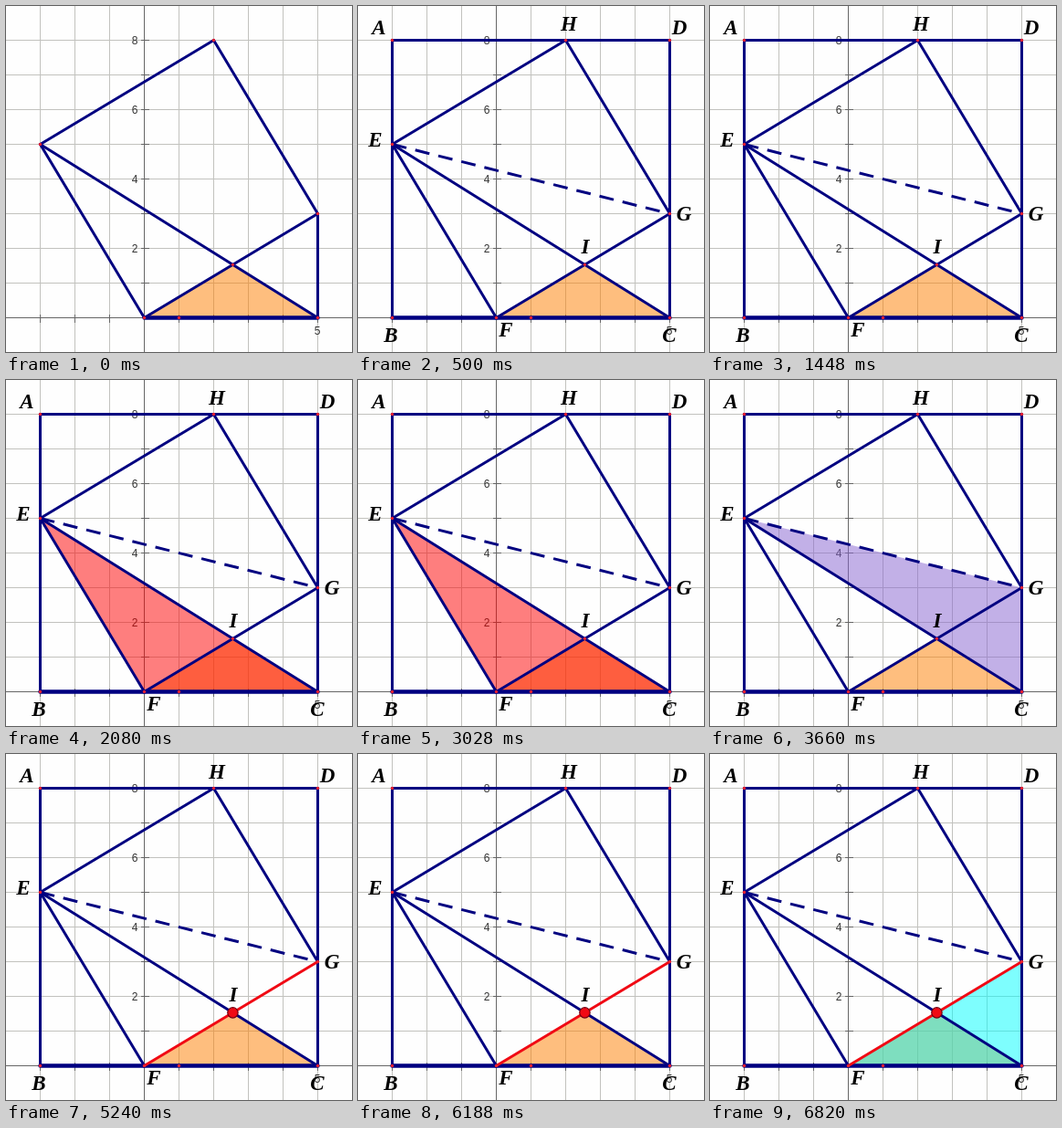
An HTML page that plays this animation: 379 px wide and 379 px high, repeating every 8000 ms.

```html
<!DOCTYPE html>
<html lang="en">
<head>
<meta charset="utf-8">
<title>Triangle areas in a square</title>
<style>
  html, body { margin: 0; width: 100%; height: 100%; overflow: hidden; background: #fefefe; }
  svg { display: block; width: 379px; height: 379px; }
  .number { font: 12px "Liberation Sans", Arial, sans-serif; fill: #333; }
  .label { font: italic bold 23px "Liberation Serif", "Times New Roman", serif; fill: #000; text-anchor: middle; }
</style>
</head>
<body>
<svg id="stage" viewBox="0 0 379 379"></svg>
<script>
const LOOP = 8000;
const STARTS = [0, 500, 2080, 3660, 5240, 6820];
const NAVY = '#000080';
const RED = '#f00a14';
const UNIT = 38;
const px = x => 151.5 + x * UNIT;
const py = y => 341.5 - y * UNIT;

// Vertices in graph units
const P = {
  A: [-3, 8], B: [-3, 0], C: [5, 0], D: [5, 8], E: [-3, 5],
  F: [0, 0], G: [5, 3], H: [2, 8], I: [125 / 49, 75 / 49], U: [1, 0]
};
const at = name => [px(P[name][0]), py(P[name][1])];

const stage = document.getElementById('stage');
const staged = [];

// Adds a shape that is visible in the given steps, or always
function add(tag, attrs, steps) {
  const el = document.createElementNS('http://www.w3.org/2000/svg', tag);
  for (const key in attrs) el.setAttribute(key, attrs[key]);
  stage.appendChild(el);
  if (steps) staged.push({ el, steps });
  return el;
}

function rule(x1, y1, x2, y2, stroke) {
  add('line', { x1, y1, x2, y2, stroke, 'shape-rendering': 'crispEdges' });
}

function fill(names, color, steps) {
  const points = [...names].map(n => at(n).join()).join(' ');
  add('polygon', { points, fill: color, 'fill-opacity': 0.5 }, steps);
}

function segment(names, steps, width = 3, stroke = NAVY, dash = 'none') {
  const [[x1, y1], [x2, y2]] = [...names].map(at);
  add('line', {
    x1, y1, x2, y2, stroke, 'stroke-width': width,
    'stroke-dasharray': dash, 'stroke-linecap': dash === 'none' ? 'round' : 'butt'
  }, steps);
}

function text(string, x, y, cls, anchor, steps) {
  add('text', { x, y, class: cls, 'text-anchor': anchor }, steps).textContent = string;
}

const LABELED = [1, 2, 3, 4, 5];

// Grid, axes and ticks
for (let x = -3; x <= 5; x++) rule(px(x), 0, px(x), 379, '#c2c2be');
for (let y = 0; y <= 8; y++) rule(0, py(y), 379, py(y), '#c2c2be');
rule(0, py(0), 379, py(0), '#666');
rule(px(0), 0, px(0), 379, '#666');
for (let x = -3; x <= 5; x++) rule(px(x), py(0) - 4, px(x), py(0) + 5, '#666');
for (let y = 1; y <= 8; y++) rule(px(0) - 4, py(y), px(0) + 5, py(y), '#666');
for (let y = 2; y <= 8; y += 2) text(y, 144.5, py(y) + 4, 'number', 'end');
text('5', 341, 359.5, 'number', 'middle');

// Shaded triangles
fill('FIC', '#ff8000');
fill('EFC', '#ff0000', [2]);
fill('EGC', '#8765d1', [3]);
fill('FGC', '#00ffff', [5]);

// Edges
segment('EG', LABELED, 3, NAVY, '16 10');
['EH', 'HG', 'GC', 'FE', 'EC'].forEach(s => segment(s));
['AB', 'AD', 'DG'].forEach(s => segment(s, LABELED));
segment('FC', null, 4.5);
segment('BF', LABELED, 4.5);
segment('FG', [0, 1, 2, 3]);
segment('FG', [4, 5], 3, RED);

// Points
for (const name in P) {
  const [cx, cy] = at(name);
  add('circle', { cx, cy, r: 1.7, fill: '#e82030' }, 'ABD'.includes(name) ? LABELED : null);
}
const [ix, iy] = at('I');
add('circle', { cx: ix, cy: iy, r: 5.7, fill: RED, stroke: '#700010', 'stroke-width': 1.2 }, [4, 5]);

// Names: letter, centre, baseline
[
  ['A', 23, 31], ['B', 36, 368], ['C', 341, 368], ['D', 352, 31], ['E', 19, 154],
  ['F', 162, 362], ['G', 357, 235], ['H', 231, 27], ['I', 249, 271]
].forEach(([name, x, y]) => text(name, x, y, 'label', 'middle', LABELED));

let shown = -1;
const origin = performance.now();
function draw(now) {
  const t = Math.max(0, now - origin) % LOOP;
  const step = STARTS.filter(s => s <= t).length - 1;
  if (step !== shown) {
    shown = step;
    for (const { el, steps } of staged) {
      el.style.visibility = steps.includes(step) ? 'visible' : 'hidden';
    }
  }
  requestAnimationFrame(draw);
}
draw(origin);
</script>
</body>
</html>
```
